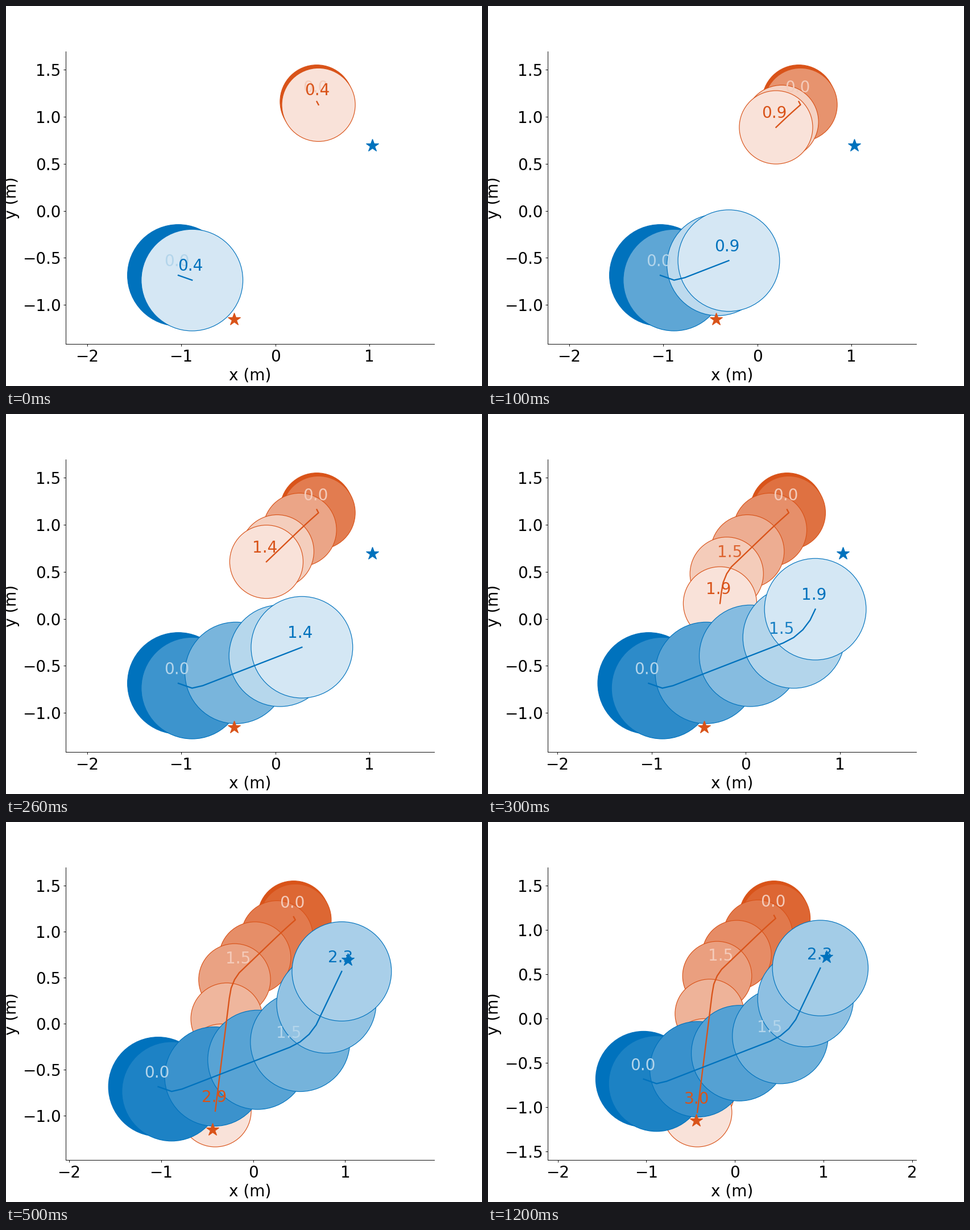
Recreate the animation shown at these times as a matplotlib script. Size 837 by 669 pixels, loop 1.6 s.

```python
import numpy as np
import matplotlib.pyplot as plt
from matplotlib.animation import FuncAnimation
from matplotlib.ticker import MultipleLocator

DPI = 83.625
LOOP, HOLD = 1600, 100
DT, LAST_STEP = 0.1, 30
CIRCLE_EVERY, LABEL_EVERY = 4, 15


def drive(start, steps, keys):
    """Integrate (time, speed, heading) keys, blended linearly, into a path."""
    times, speeds, headings = np.transpose(keys)
    mid = (np.arange(steps) + 0.5) * DT
    dist = np.interp(mid, times, speeds) * DT
    angle = np.radians(np.interp(mid, times, headings))
    moves = np.column_stack([dist * np.cos(angle), dist * np.sin(angle)])
    return np.vstack([start, start + np.cumsum(moves, axis=0)])


AGENTS = [
    dict(color=(0.850, 0.325, 0.098), radius=0.39, goal=(-0.439, -1.155),
         path=drive((0.440, 1.163), LAST_STEP,
                    [(0.35, 0.097, 298.5), (0.45, 0.567, 221.3),
                     (0.85, 0.85, 223.8), (1.45, 0.775, 223.8),
                     (1.75, 1.123, 260), (1.85, 1.123, 262.9)])),
    dict(color=(0.0, 0.447, 0.741), radius=0.54, goal=(1.031, 0.693),
         path=drive((-1.031, -0.685), 23,
                    [(0.35, 0.387, -19.4), (0.45, 1.16, 13),
                     (0.55, 1.256, 21.2), (1.5, 1.256, 21.2),
                     (1.84, 1.29, 64.5)])),
]

plt.rcParams.update({"font.family": "DejaVu Sans", "font.size": 24})
fig = plt.figure(figsize=(10.009, 8), dpi=DPI)
ax = fig.add_axes([0.125, 0.11, 0.775, 0.77])


def tint(color, alpha):
    """Blend a colour with white."""
    return tuple(1 - alpha * (1 - c) for c in color)


def label(pos, step, color):
    ax.text(pos[0] - 0.15, pos[1] + 0.1, f"{step * DT:.1f}", color=color)


def draw_agent(agent, now):
    """Draw one agent's trail and return the corners of its extent."""
    color, radius, path = agent["color"], agent["radius"], agent["path"]
    end = min(now, len(path) - 1)
    span = 1.2 * now

    ax.plot(*path[:end + 1].T, color=color, lw=2)
    ax.plot(*agent["goal"], color=color, marker="*", markersize=20)

    corners = [agent["goal"]]
    for step in [*range(0, end, CIRCLE_EVERY), end]:
        pos = path[step]
        ax.add_patch(plt.Circle(pos, radius, fc=tint(color, 1 - step / span),
                                ec=color))
        corners += [pos - radius, pos + radius]

    for step in range(0, end, LABEL_EVERY):
        alpha = 0.3 if step / span < 0.5 else 0.9
        label(path[step], step, tint(color, alpha))
    label(path[end], end, color)
    return corners


def fit_view(corners):
    """Pad the height by 5% and widen x to keep equal units."""
    low, high = np.min(corners, axis=0), np.max(corners, axis=0)
    mid = (low + high) / 2
    half_y = (high[1] - low[1]) * 0.55
    half_x = half_y * (0.775 * 837) / (0.77 * 669)
    ax.set_xlim(mid[0] - half_x, mid[0] + half_x)
    ax.set_ylim(mid[1] - half_y, mid[1] + half_y)


def draw(frame):
    now = min(4 + 5 * frame, LAST_STEP)
    ax.clear()
    ax.spines[["top", "right"]].set_visible(False)
    ax.xaxis.set_major_locator(MultipleLocator(1))
    ax.yaxis.set_major_locator(MultipleLocator(0.5))
    ax.set_xlabel("x (m)")
    ax.set_ylabel("y (m)")
    corners = []
    for agent in AGENTS:
        corners += draw_agent(agent, now)
    fit_view(corners)
    return []


anim = FuncAnimation(fig, draw, frames=LOOP // HOLD, interval=HOLD,
                     init_func=lambda: draw(0), repeat=True, repeat_delay=0)
plt.show()
```
